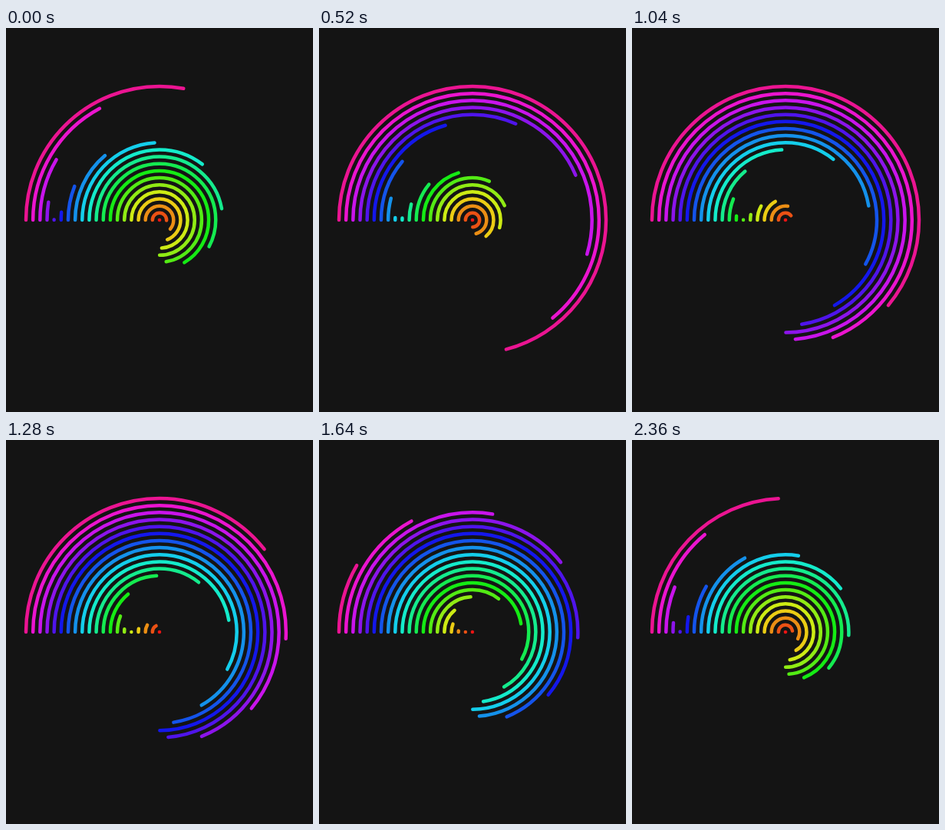
These frames come from a looping animation (400 px wide and 500 px high, 2.4 s). An HTML page:

```html
<!DOCTYPE html>
<html lang="en">
<head>
<meta charset="utf-8">
<title>Rainbow arcs</title>
<style>
  html, body {
    margin: 0;
    width: 100%;
    height: 100%;
    overflow: hidden;
    background: #141414;
  }
  svg { display: block; width: 100%; height: 100%; }
  circle {
    fill: none;
    stroke: hsl(calc(var(--i) * 17.1) 84% 50%);
    stroke-width: 4.5;
    stroke-linecap: round;
    /* the bezier follows half a cosine wave */
    animation: sweep 1200ms cubic-bezier(.3642, 0, .6358, 1) infinite alternate;
    animation-delay: calc(var(--i) * -120ms - 620ms);
  }
  @keyframes sweep {
    from { stroke-dasharray: 0 400; }
    to { stroke-dasharray: 270 400; }
  }
</style>
</head>
<body>
<svg viewBox="0 0 400 500"><g id="rings" transform="translate(200 250) rotate(180)"></g></svg>
<script>
  const COUNT = 20;
  const OUTER = 174;
  const rings = document.getElementById('rings');

  for (let i = 0; i < COUNT; i++) {
    const ring = document.createElementNS('http://www.w3.org/2000/svg', 'circle');
    ring.setAttribute('r', Math.max(0.1, OUTER * i / (COUNT - 1)));
    ring.setAttribute('pathLength', 360);
    ring.style.setProperty('--i', i);
    rings.append(ring);
  }
</script>
</body>
</html>
```
